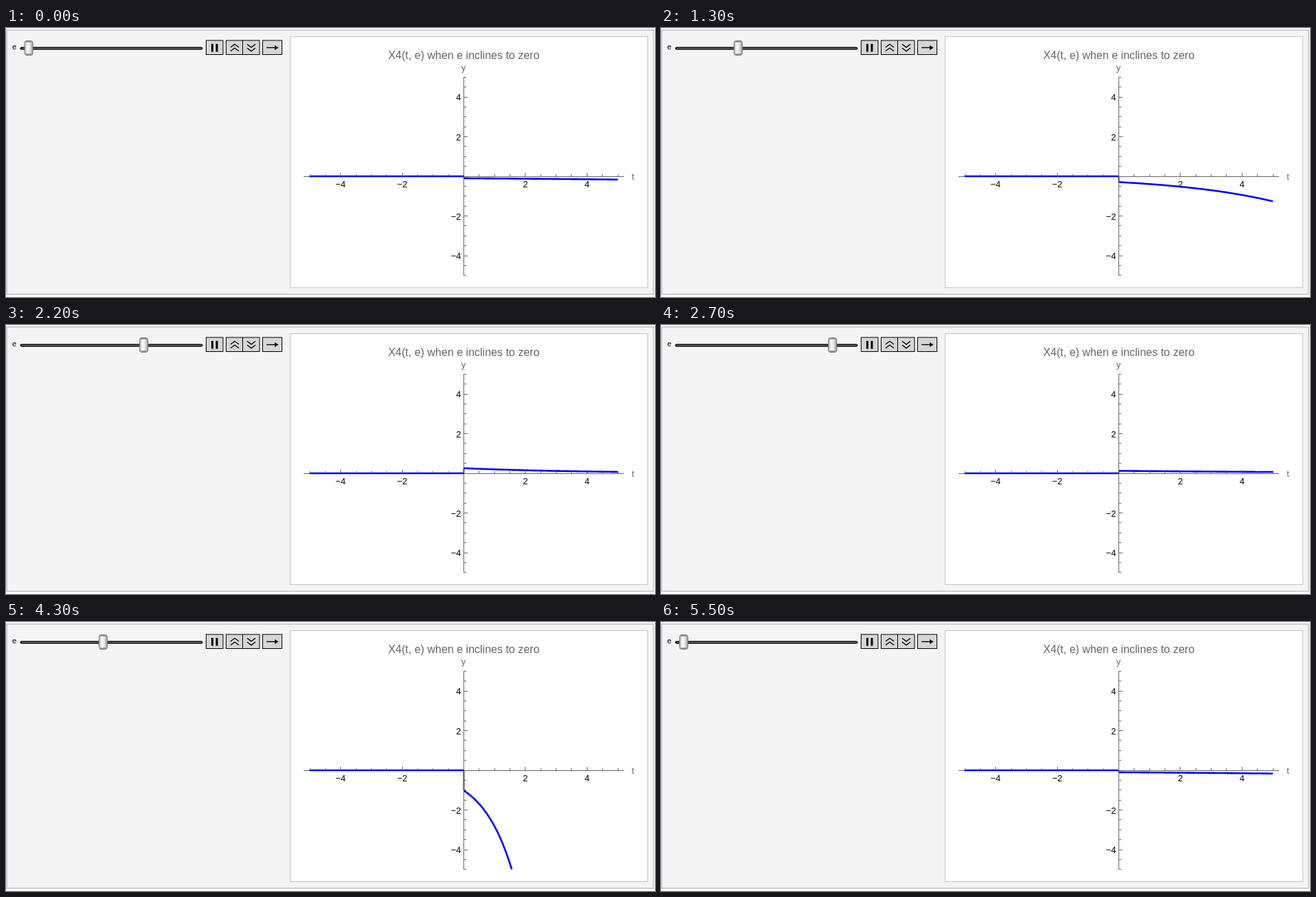
Write an HTML page that moves like this. It is 942 by 390 pixels and loops after 6 s.

```html
<!DOCTYPE html>
<html lang="en">
<head>
<meta charset="utf-8">
<title>Pulse plot</title>
<style>
  html, body { margin: 0; width: 100%; height: 100%; overflow: hidden; background: #fff; }
  svg { display: block; width: 942px; height: 390px; }
  text { font-family: "Liberation Sans", Arial, sans-serif; }
  .num { font-size: 13px; }
  .name { fill: #666; text-anchor: middle; }
  .axis { stroke: #666; fill: none; }
  .button { fill: #d6d6d6; stroke: #000; }
  .icon { fill: none; stroke: #000; stroke-width: 1.4; }
  .curve { fill: none; stroke: #00f; stroke-width: 2.6; stroke-linejoin: round; }
</style>
</head>
<body>
<svg viewBox="0 0 942 390">
  <defs>
    <linearGradient id="metal">
      <stop offset="0" stop-color="#b0b0b0"/>
      <stop offset=".35" stop-color="#fff"/>
      <stop offset=".65" stop-color="#e4e4e4"/>
      <stop offset="1" stop-color="#999"/>
    </linearGradient>
    <clipPath id="range"><rect x="432" y="71" width="466" height="287.5"/></clipPath>
  </defs>

  <rect x="1" y="3" width="939" height="383" fill="#f4f4f4" stroke="#c4c4c4" stroke-width="1.6"/>
  <rect x="412.5" y="12.5" width="519" height="364" fill="#fff" stroke="#c4c4c4"/>

  <text x="9" y="31" font-size="11">e</text>
  <rect x="20.5" y="27.5" width="265" height="4" rx="2"/>
  <path d="M23 29.5H284" stroke="#8a8a8a"/>
  <g id="handle">
    <rect x="-6" y="18.5" width="12" height="21" rx="3" fill="url(#metal)" stroke="#777"/>
    <path d="M-4.5 20H4.5M-4.5 38H4.5" stroke="#999" stroke-width="2"/>
  </g>

  <rect class="button" x="290.5" y="18" width="24.5" height="20.5"/>
  <rect class="button" x="319.5" y="18" width="48.5" height="20.5"/>
  <rect class="button" x="372.5" y="18" width="28" height="20.5"/>
  <path d="M343.5 18V38.5" stroke="#000"/>
  <path d="M298 23h3v11.5h-3zM304.500 23h3v11.5h-3z"/>
  <path class="icon" d="M326 28l6-4.500 6 4.500M326 33.500l6-4.500 6 4.500"/>
  <path class="icon" d="M350 23.500l6 4.500 6-4.500M350 29l6 4.500 6-4.500"/>
  <path class="icon" d="M378 28.500H393"/>
  <path d="M395.500 28.500l-5.500-3.500v7z"/>

  <text class="name" x="664.5" y="45" font-size="16">X4(t, e) when e inclines to zero</text>
  <text class="name" x="664" y="62" font-size="13">y</text>
  <text class="name" x="910" y="220" font-size="13">t</text>

  <path class="axis" d="M432 215.500H897"/>
  <g clip-path="url(#range)">
    <path class="curve" d="M440.500 215H664.500"/>
    <path class="curve" id="tail"/>
    <path id="jump" stroke="#282838" stroke-width="2"/>
  </g>
  <path class="axis" d="M664.500 71V359"/>
  <path class="axis" id="ticks"/>
  <g id="labels"></g>
</svg>
<script>
const STEP = 100, HOLD = 500, LOOP = 6000, LAST = 51;
const byId = id => document.getElementById(id);
const toX = t => 664.5 + 44.7 * t;
const toY = y => 215 - 28.75 * y;
const snap = v => Math.floor(v) + 0.5;

function label(text, x, y, anchor) {
  const node = document.createElementNS('http://www.w3.org/2000/svg', 'text');
  node.setAttribute('class', 'num');
  node.setAttribute('x', x);
  node.setAttribute('y', y);
  node.setAttribute('text-anchor', anchor);
  node.textContent = String(text).replace('-', '\u2212');
  byId('labels').append(node);
}

function drawTicks() {
  let d = '';
  for (let v = -5; v <= 5; v += 0.5) {
    if (!v) continue;
    const major = v % 2 === 0, size = major ? 5 : 3;
    d += `M${snap(toX(v))} 215v${-size}M665 ${snap(toY(v))}h${size}`;
    if (major) {
      label(v, toX(v), 231, 'middle');
      label(v, 660.5, toY(v) + 5, 'end');
    }
  }
  byId('ticks').setAttribute('d', d);
}

// The slider sweeps from -10 up to 10 and back.
function epsilon(ms) {
  const k = ms < HOLD ? 0 : Math.min(LAST, Math.floor((ms - HOLD) / STEP) + 1);
  return Math.max(-10, 10 - 0.8133 * Math.abs(k - LAST / 2));
}

// Right branch: exp(-t / e) / e
function render(e) {
  const points = [];
  for (let i = 0; i <= 200; i++) {
    const t = i / 40, y = Math.exp(-t / e) / e;
    points.push(`${toX(t).toFixed(2)} ${toY(Math.max(y, -9)).toFixed(2)}`);
    if (y < -9) break;
  }
  byId('tail').setAttribute('d', 'M' + points.join('L'));
  byId('jump').setAttribute('d', `M664.5 215V${toY(1 / e)}`);
  byId('handle').setAttribute('transform', `translate(${Math.round(153 + 12 * e)} 0)`);
}

drawTicks();
const start = performance.now();
let shown;
function tick() {
  const e = epsilon((performance.now() - start) % LOOP);
  if (e !== shown) render(shown = e);
  requestAnimationFrame(tick);
}
tick();
</script>
</body>
</html>
```
